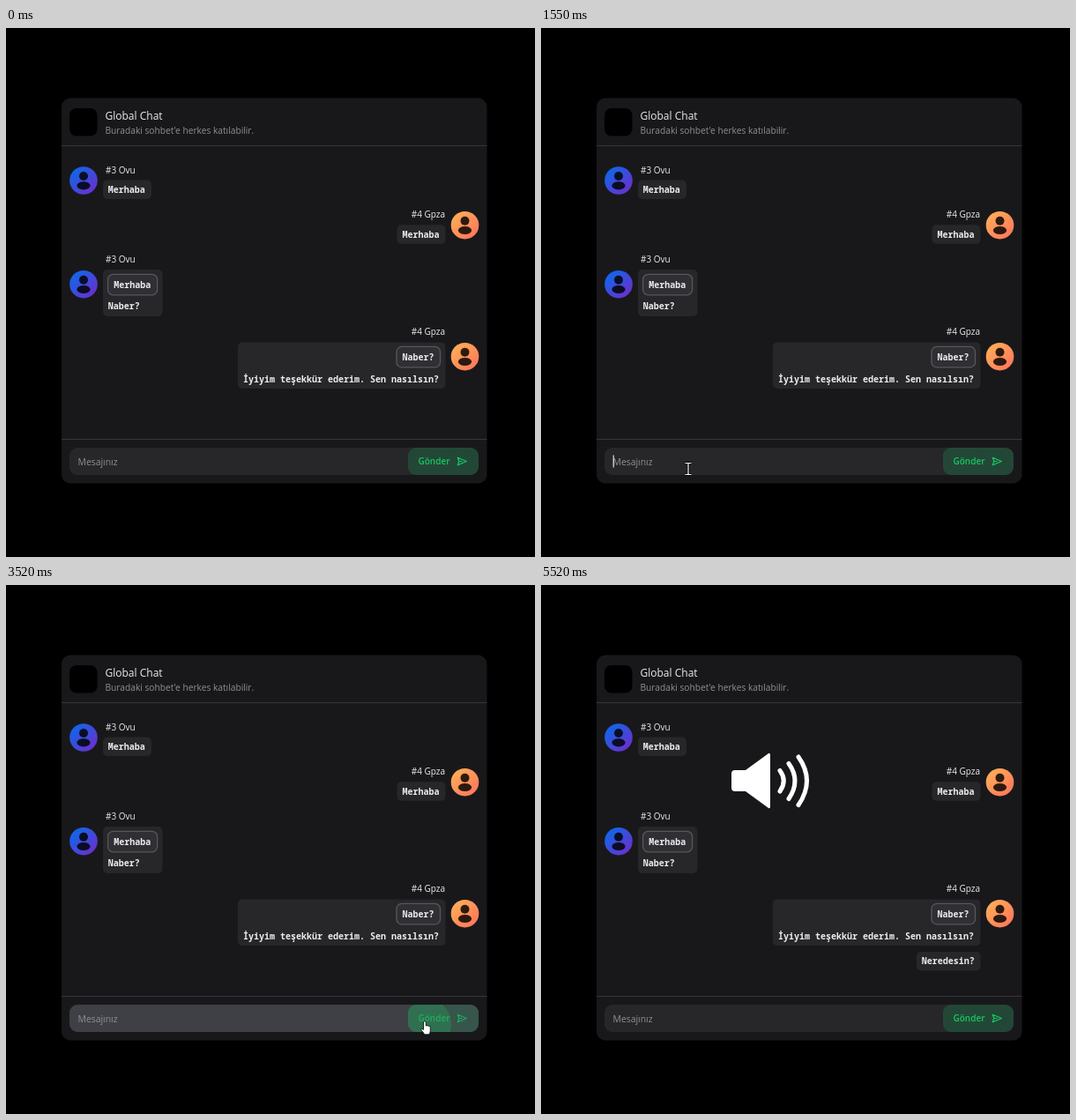
Write an HTML page that moves like this. It is 600x600 px and loops after 5.55 s.

```html
<!DOCTYPE html>
<html lang="tr">
<head>
<meta charset="utf-8">
<title>Global Chat</title>
<style>
  html, body { margin: 0; height: 100%; overflow: hidden; background: #000; }
  svg { display: block; width: 100vw; height: 100vh; }
  text { font: 10px "Open Sans", "Noto Sans", sans-serif; fill: #ececee; white-space: pre; }
  .mono { font: 700 10px "Noto Sans Mono", "DejaVu Sans Mono", monospace; }
  .end { text-anchor: end; }
  .muted { fill: #8e8e96; }
  .bubble { fill: #27272a; }
  .quote { fill: #2f2f34; stroke: #56565e; stroke-width: 1.3; }
  .field { font-size: 10.4px; }
  .cursor { fill: #fff; stroke: #000; stroke-width: .8; stroke-linejoin: round; }
</style>
</head>
<body>
<svg viewBox="0 0 600 600">
  <defs>
    <linearGradient id="blue" x2="1" y2="1"><stop stop-color="#006fee"/><stop offset="1" stop-color="#7828c8"/></linearGradient>
    <linearGradient id="orange" x2="1" y2="1"><stop stop-color="#ffb457"/><stop offset="1" stop-color="#ff705b"/></linearGradient>
    <clipPath id="buttonClip"><rect x="456" y="476" width="80" height="31" rx="9"/></clipPath>
    <g id="avatar">
      <circle r="15.8"/>
      <g fill="#000" opacity=".82"><circle cy="-5" r="5"/><ellipse cy="5.8" rx="7.6" ry="4.6"/></g>
    </g>
  </defs>

  <rect x="63" y="79.5" width="482.5" height="437" rx="10" fill="#18181b"/>
  <path d="M63 133.5H545.5M63 466.5H545.5" stroke="#37373b"/>
  <rect x="72" y="91" width="31.5" height="31.5" rx="8"/>
  <text x="112.5" y="103.5" style="font-size:12px">Global Chat</text>
  <text x="112.5" y="119.7" class="muted" style="font-size:10.2px">Buradaki sohbet'e herkes katılabilir.</text>

  <use href="#avatar" x="88" y="173" fill="url(#blue)"/>
  <text x="113" y="164.5">#3 Ovu</text>
  <rect class="bubble" x="110" y="172.5" width="55" height="21.5" rx="5"/>
  <text class="mono" x="115.8" y="187">Merhaba</text>

  <use href="#avatar" x="520.5" y="223.7" fill="url(#orange)"/>
  <text class="end" x="498" y="215.3">#4 Gpza</text>
  <rect class="bubble" x="443.5" y="223.2" width="55" height="21.5" rx="5"/>
  <text class="mono" x="449.5" y="237.6">Merhaba</text>

  <use href="#avatar" x="88" y="290.7" fill="url(#blue)"/>
  <text x="113" y="266.3">#3 Ovu</text>
  <rect class="bubble" x="110" y="274" width="67.5" height="53" rx="5"/>
  <rect class="quote" x="115.6" y="279.3" width="56" height="23.5" rx="6"/>
  <text class="mono" x="122.3" y="294.5">Merhaba</text>
  <text class="mono" x="115.8" y="319.2">Naber?</text>

  <use href="#avatar" x="520.5" y="372.7" fill="url(#orange)"/>
  <text class="end" x="498" y="348.4">#4 Gpza</text>
  <rect class="bubble" x="263" y="356.5" width="235.5" height="52.5" rx="5"/>
  <rect class="quote" x="443" y="361.4" width="49.5" height="23.5" rx="6"/>
  <text class="mono" x="449.4" y="376.8">Naber?</text>
  <text class="mono" x="269" y="401.7">İyiyim teşekkür ederim. Sen nasılsın?</text>

  <g id="sent">
    <rect class="bubble" x="426" y="416" width="72.5" height="21.5" rx="5"/>
    <text class="mono" x="431.7" y="430.2">Neredesin?</text>
  </g>

  <rect id="input" x="72" y="476" width="464" height="31" rx="9"/>
  <text id="placeholder" class="field muted" x="81.5" y="495.5">Mesajınız</text>
  <text id="typed" class="field" x="81.5" y="495.5"></text>
  <path id="caret" d="M82.2 484.5v14" stroke="#fff"/>

  <g id="button" clip-path="url(#buttonClip)">
    <rect x="456" y="476" width="80" height="31" fill="#17c964" opacity=".2"/>
    <text x="467.5" y="495.3" style="font-weight:600;fill:#17c964">Gönder</text>
    <path d="M512.3 487.2L522.3 491.5L512.3 495.8L513.8 491.5ZM513.8 491.5H517.5" fill="none" stroke="#17c964" stroke-width="1.2" stroke-linejoin="round"/>
    <circle id="ripple" cx="475" cy="498" fill="#17c964"/>
  </g>

  <g id="speaker" fill="#fff">
    <path id="cone"/>
    <g id="waves" fill="none" stroke="#fff" stroke-width="5" stroke-linecap="round">
      <path d="M271 210.5Q279.5 222 271 234"/>
      <path d="M281 202.5Q295 222 281 242.5"/>
      <path d="M292 195Q311 222 292 249.5"/>
    </g>
  </g>

  <path id="arrow" class="cursor" d="M0 0V12.5L3 9.8L5 14L7 13L5.2 9.2H9Z"/>
  <g id="beam" fill="none">
    <path d="M-3.5 -6.5H-1Q0 -6.5 0 -5.5V5.5Q0 6.5 -1 6.5H-3.5M3.5 -6.5H1Q0 -6.5 0 -5.5M0 5.5Q0 6.5 1 6.5H3.5" stroke="#000" stroke-width="3"/>
    <path d="M-3.5 -6.5H-1Q0 -6.5 0 -5.5V5.5Q0 6.5 -1 6.5H-3.5M3.5 -6.5H1Q0 -6.5 0 -5.5M0 5.5Q0 6.5 1 6.5H3.5" stroke="#fff" stroke-width="1.2"/>
  </g>
  <path id="hand" class="cursor" d="M-1.5-6.5q1.4-1.5 2.8 0v4.5q2-1 3 .3q2-.3 2 1.5v3.5q0 2-1.2 4.5h-5.5q-1-2.5-3.8-5q-.3-2 1.2-1.4l1.5 1z"/>
</svg>

<script>
const LOOP = 5550, MESSAGE = 'Neredesin?';
const ENTER = 950, FOCUS = 1480, TYPE = 1700, CLICK = 3360, SENT = 3680, SOUND = 4250, LEAVE = 5000;
const $ = id => document.getElementById(id);
const ramp = (t, start, length) => Math.min(1, Math.max(0, (t - start) / length));
const ease = p => p * p * (3 - 2 * p);
const mix = (a, b, p) => a + (b - a) * p;
const show = (node, on) => node.style.visibility = on ? 'visible' : 'hidden';

function pointer(t) {
  if (t < 1210) {
    const p = ramp(t, ENTER, 260);
    return [mix(195, 173.5, p), mix(551, 505, p)];
  }
  const settle = ease(ramp(t, 1210, 190)), travel = ease(ramp(t, 2870, 450));
  return [mix(mix(173.5, 167, settle), 475, travel), mix(mix(505, 500, settle), 502, travel)];
}

function drawCursor(t) {
  const [x, y] = pointer(t), visible = t >= ENTER && t < LEAVE;
  const kind = y > 507 ? 'arrow' : x < 456 ? 'beam' : 'hand';
  for (const id of ['arrow', 'beam', 'hand']) {
    show($(id), visible && id === kind);
    $(id).setAttribute('transform', `translate(${x} ${y})`);
  }
}

function drawInput(t) {
  let count = t < TYPE ? 0 : Math.min(9, 1 + Math.floor((t - TYPE) / 98));
  if (t >= 2700) count = 10;
  if (t >= CLICK) count = 0;
  $('typed').textContent = MESSAGE.slice(0, count);
  show($('placeholder'), !count);

  const width = count ? $('typed').getComputedTextLength() : 0;
  $('caret').setAttribute('transform', `translate(${width} 0)`);
  show($('caret'), t >= FOCUS && t < CLICK && (t < 3200));

  const light = ramp(t, 1210, 150) - ramp(t, FOCUS, 60) + ramp(t, CLICK, 130) - ramp(t, LEAVE, 150);
  $('input').setAttribute('fill', `rgb(${mix(39, 63, light)} ${mix(39, 63, light)} ${mix(42, 70, light)})`);
}

function drawButton(t) {
  $('button').setAttribute('opacity', 1 - .2 * (ramp(t, 3280, 150) - ramp(t, LEAVE, 150)));
  const p = ramp(t, CLICK, 430);
  $('ripple').setAttribute('r', 80 * p);
  $('ripple').setAttribute('opacity', .5 * (1 - p));
}

function drawSpeaker(t) {
  show($('speaker'), t >= SOUND);
  const p = ramp(t, 4850, 120), edge = mix(257, 260, p), top = mix(190, 191, p), bottom = 444 - top;
  $('cone').setAttribute('d', `M220 210H232L${edge - 2 * p} ${top}Q${edge} ${top - p} ${edge} ${top + 2 * p}
    V${bottom - 2 * p}Q${edge} ${bottom + p} ${edge - 2 * p} ${bottom}L232 234H220Q216 234 216 230V214Q216 210 220 210Z`);
  [...$('waves').children].forEach((wave, i) => wave.setAttribute('opacity', ramp(t, 4950 + i * 130, 80)));
}

function frame(now) {
  const t = now % LOOP;
  drawInput(t);
  drawButton(t);
  $('sent').setAttribute('opacity', ramp(t, SENT, 120));
  drawSpeaker(t);
  drawCursor(t);
  requestAnimationFrame(frame);
}
requestAnimationFrame(frame);
</script>
</body>
</html>
```
